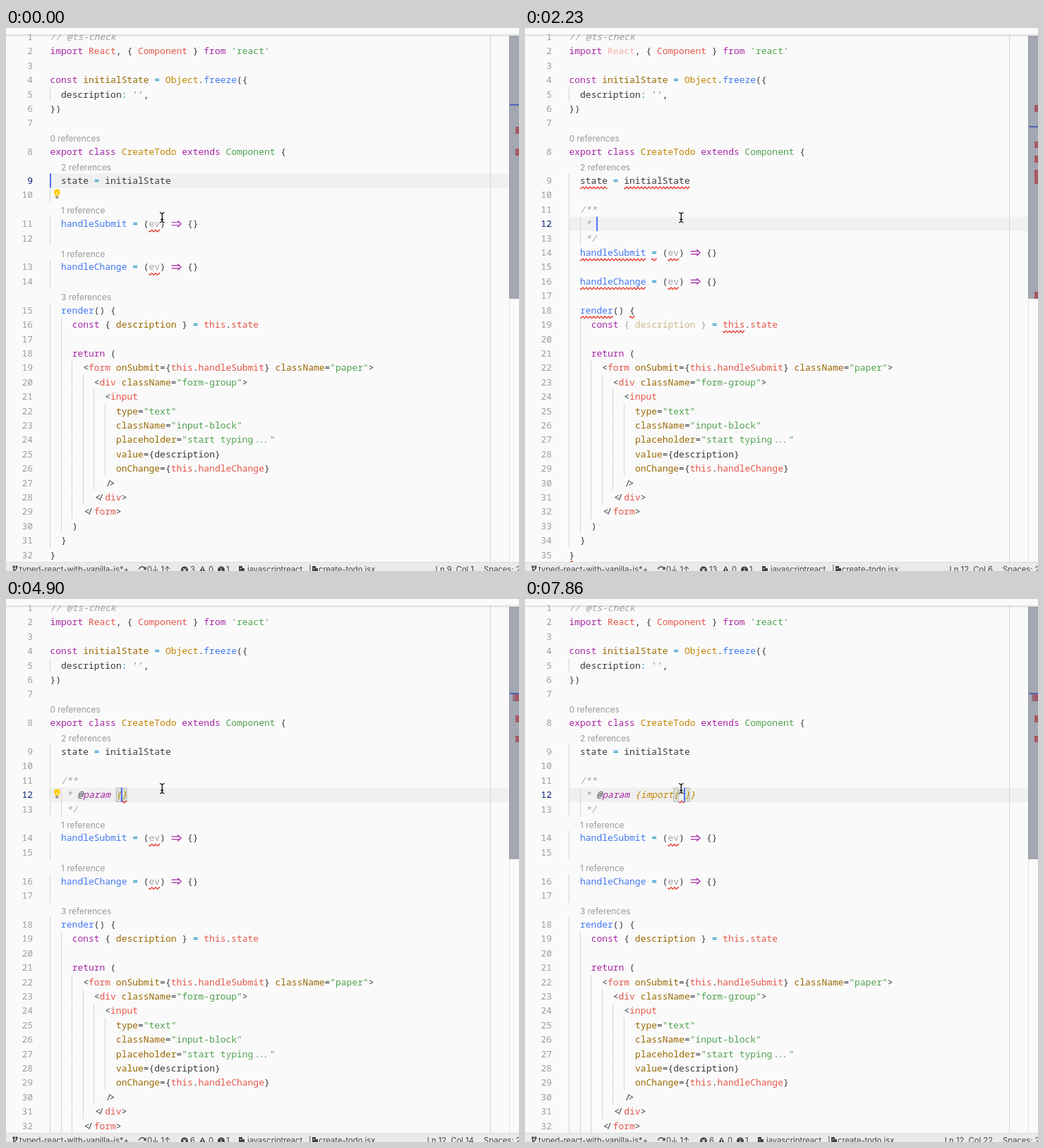
An HTML page with a canvas for the animation above (8 s loop, 727 px wide and 770 px high).

```html
<!DOCTYPE html>
<html lang="en">
<head>
<meta charset="utf-8">
<title>Editor typing</title>
<style>
html, body { margin: 0; width: 100%; height: 100%; overflow: hidden; background: #fafafa; }
canvas { display: block; }
</style>
</head>
<body>
<canvas id="stage" width="727" height="770"></canvas>
<script>
const ctx = document.getElementById('stage').getContext('2d');
const LOOP = 8000, CW = 7.78, ROW = 20.41, LEFT = 62.5;
const MONO = '12.97px "Noto Sans Mono", monospace';
const UI = 'Inter, sans-serif';

const COLORS = {
  d: '#383a42', p: '#a626a4', r: '#e45649', b: '#4078f2', k: '#0184bc', g: '#50a14f',
  o: '#c18401', w: '#986801', c: '#a0a1a7', e: '#383a42', i: '#383a42', m: '#a626a4', y: '#c18401'
};
const ITALIC = 'cimy';

// Segments split by "|": optional squiggle (~ always, ^ while broken), colour letter, text.
// An upper-case letter fades while the code is broken.
const SOURCE = [
  'c// @ts-check',
  'pimport |RReact|d, { |rComponent|d } |pfrom |g\'react\'',
  '',
  'pconst |winitialState |k= |oObject|d.|bfreeze|d({',
  'd  description|k:|g \'\'|d,',
  'd})',
  '',
  'pexport class |oCreateTodo |pextends |gComponent |d{',
  'd  |^dstate|k = |^dinitialState',
  '',
  'd  |^bhandleSubmit|d |^k=|d (|~eev|d) |p=>|d {}',
  '',
  'd  |^bhandleChange|k = |d(|~eev|d) |p=>|d {}',
  '',
  'd  |^brender|d() |^d{',
  'p    const |D{ |Wdescription|D }|k = |^rthis|d.|rstate',
  '',
  'p    return |d(',
  'd      <|rform |wonSubmit|d={|rthis|d.|rhandleSubmit|d} |wclassName|d=|g"paper"|d>',
  'd        <|rdiv |wclassName|d=|g"form-group"|d>',
  'd          <|rinput',
  'w            type|d=|g"text"',
  'w            className|d=|g"input-block"',
  'w            placeholder|d=|g"start typing..."',
  'w            value|d={description}',
  'w            onChange|d={|rthis|d.|rhandleChange|d}',
  'd          />',
  'd        </|rdiv|d>',
  'd      </|rform|d>',
  'd    )',
  'd  }',
  '^d}'
];
const LENSES = { 7: '0 references', 8: '2 references', 10: '1 reference', 12: '1 reference', 14: '3 references' };

const doc = s => ['c  /**', 'c   * ' + s, 'c   */'];
const param = s => doc('|i@|mparam|y' + s);
const ident = n => ({
  add: param(' {' + 'import'.slice(0, n) + '}'),
  cur: [12, 13 + n], match: [12, 13 + n], wave: [13, 13 + n], caret: true
});

const STEPS = [
  [0, { add: [], cur: [9, 0], lens: 1, bad: false, comment: false, caret: true, errors: 3, bulb: 11,
        marks: [[140, 10], [171, 10]], here: 109, thumb: 384, wave: null, match: [], twin: false }],
  [150, { cur: [10, 0], bulb: 0, here: 119 }],
  [450, { add: [''], cur: [11, 2], here: 128, thumb: 379 }],
  [590, { marks: [[149, 9], [179, 9]] }],
  [1040, { caret: false }],
  [1340, { add: ['k  /'], cur: [11, 3], caret: true }],
  [1790, { add: ['c  /*'], cur: [11, 4], comment: true, bad: true, errors: 13,
           marks: [[109, 9], [149, 9], [179, 9], [210, 18], [380, 8]] }],
  [1940, { add: ['c  /** */'], cur: [11, 5], comment: false }],
  [2230, { add: doc(''), cur: [12, 5], lens: null, here: 140, thumb: 384,
           marks: [[109, 10], [161, 9], [181, 10], [201, 20], [374, 10]] }],
  [2530, { add: doc('@'), cur: [12, 6], bad: false, errors: 3, marks: [[171, 10], [191, 10]] }],
  [2670, { lens: 0, here: 134, thumb: 369, marks: [[165, 10], [194, 9]] }],
  [3120, { add: doc('@pa'), cur: [12, 8], wave: [6, 8], errors: 4, marks: [[135, 10], [165, 10], [194, 9]] }],
  [3270, { add: doc('@par'), cur: [12, 9], wave: [6, 9] }],
  [3570, { add: doc('@para'), cur: [12, 10], wave: [6, 10] }],
  [3720, { add: param(''), cur: [12, 11], wave: null, errors: 3, marks: [[165, 10], [194, 9]] }],
  [3870, { lens: 0.25 }],
  [4020, { lens: 0.5 }],
  [4160, { lens: 0.75 }],
  [4310, { lens: 1, add: param(' '), cur: [12, 12] }],
  [4460, { add: param(' {}'), cur: [12, 13], match: [12, 13], twin: true,
           marks: [[135, 10], [165, 10], [194, 9]] }],
  [4900, { bulb: 13, errors: 6, wave: [13, 14] }],
  [5050, { caret: false }],
  [5490, { caret: true }],
  [5940, { caret: false }],
  [6090, ident(1)],
  [6230, ident(2)],
  [6530, ident(3)],
  [6680, ident(4)],
  [6830, ident(6)],
  [7130, { add: param(' {import()}'), cur: [12, 20], match: [19, 20], bulb: 0 }],
  [7420, { wave: null, errors: 5 }],
  [7570, { add: param(" {import(')}"), cur: [12, 21], match: [19, 21] }],
  [7860, { wave: [20, 21], errors: 6 }]
];

const colX = c => LEFT + c * CW;
const rowY = r => 12.4 + r * ROW;

function rect(color, x, y, w, h) {
  ctx.fillStyle = color;
  ctx.fillRect(x, y, w, h);
}

function stroke(color, width, ...lines) {
  ctx.strokeStyle = color;
  ctx.lineWidth = width;
  ctx.beginPath();
  for (const line of lines) line.forEach(([x, y], i) => i ? ctx.lineTo(x, y) : ctx.moveTo(x, y));
  ctx.stroke();
}

function wavy(from, to, y) {
  const pts = [];
  for (let x = colX(from); x <= colX(to); x += 0.5) pts.push([x, y + 10 + 1.3 * Math.sin(x * Math.PI * 2 / 5.2)]);
  stroke('#e51400', 1.1, pts);
}

const parse = line => line.split('|').filter(Boolean).map(s => {
  const [, mark, key, text] = s.match(/^([~^]?)(\w)(.*)$/);
  return { mark, key, text };
});
const indentOf = line => parse(line).map(s => s.text).join('').search(/\S|$/);

// Ligatures: an arrow, and pairs or dots set closer together.
function glyphs(text, col, y) {
  for (const part of text.split(/(=>|<\/|\/>|\.\.\.)/)) {
    const x = colX(col), n = part.length;
    if (part === '=>') {
      stroke(ctx.fillStyle, 1.2, [[x + 1, y - 2], [x + 12.5, y - 2]], [[x + 1, y + 2], [x + 12.5, y + 2]],
        [[x + 9.5, y - 4.5], [x + 14.5, y], [x + 9.5, y + 4.5]]);
    } else if (/^(<\/|\/>|\.\.\.)$/.test(part)) {
      [...part].forEach((ch, i) => ctx.fillText(ch, x + i * CW + ((n - 1) / 2 - i) * (n > 2 ? 2 : 3), y + 4.5));
    } else ctx.fillText(part, x, y + 4.5);
    col += n;
  }
}

function drawLine(line, y, s, commented) {
  let col = 0;
  for (const { mark, key, text } of parse(line)) {
    const low = key.toLowerCase(), color = commented ? 'c' : low;
    ctx.globalAlpha = key === 'e' || (key !== low && s.bad) ? 0.45 : 1;
    ctx.font = (ITALIC.includes(color) ? 'italic ' : '') + MONO;
    ctx.fillStyle = COLORS[color];
    glyphs(text, col, y);
    ctx.globalAlpha = 1;
    if (mark === '~' || (mark && s.bad)) wavy(col, col + text.length, y);
    col += text.length;
  }
}

function drawBulb(y) {
  ctx.fillStyle = '#fc0';
  ctx.beginPath();
  ctx.arc(72.3, y - 4, 4.4, 0, 7);
  ctx.fill();
  rect('#fc0', 70, y - 1, 4.6, 2.5);
  rect('#fff3c0', 71.6, y - 4, 1.4, 4);
  rect('#6f6f6f', 70, y + 1.8, 4.6, 1.2);
  rect('#6f6f6f', 70.6, y + 3.6, 3.4, 1.2);
}

function drawCode(s) {
  const lines = [...SOURCE.slice(0, 10), ...s.add, ...SOURCE.slice(10)];
  let row = 0;
  for (let i = 0; i < lines.length && row < 37; i++, row++) {
    const src = i < 10 ? i : i < 10 + s.add.length ? -1 : i - s.add.length;
    const indent = indentOf(lines[i] || lines.slice(i).find(Boolean));
    if (LENSES[src] && (src < 10 || s.lens !== null)) {
      ctx.globalAlpha = src < 10 ? 1 : s.lens;
      ctx.font = '11.9px ' + UI;
      ctx.fillStyle = '#999';
      ctx.fillText(LENSES[src], colX(indent), rowY(row) + 6);
      ctx.globalAlpha = 1;
      row++;
    }
    const y = rowY(row), active = i + 1 === s.cur[0];
    if (active) rect('#f0f0f0', 62, y - 10.2, 651, ROW);
    for (let c = 0; c < indent; c += 2) rect('#d4d4d6', Math.floor(colX(c)), y - ROW / 2, 1, ROW);
    if (active) {
      for (const c of s.match) {
        rect('rgba(0,100,0,.1)', colX(c), y - 9.7, CW, 19.4);
        ctx.strokeStyle = '#b9b9b9';
        ctx.lineWidth = 1;
        ctx.strokeRect(colX(c) + 0.5, y - 9.7, CW - 1, 19.4);
      }
    }
    ctx.font = MONO;
    ctx.textAlign = 'right';
    ctx.fillStyle = active ? '#0b216f' : '#9d9d9f';
    ctx.fillText(i + 1, 38, y + 4.5);
    ctx.textAlign = 'left';
    drawLine(lines[i], y, s, s.comment && i > 9);
    if (active) {
      if (s.wave) wavy(...s.wave, y);
      if (s.caret) rect('#526fff', Math.floor(colX(s.cur[1])), y - 10.2, 2, ROW);
    }
  }
  if (s.bulb) drawBulb(rowY(s.bulb));
}

function drawScroll(s) {
  rect('#d6d6d8', 686, 9, 1, 749);
  rect('#e2e2e4', 713, 9, 1, 749);
  for (const [y, h] of s.marks) rect('#ff5a5a', 722, y, 5, h);
  if (s.twin) rect('#e08a92', 718, 135, 4, 10);
  rect('#526fff', 714, s.here - 1, 13, 2);
  rect('rgba(78,86,108,.5)', 713, 11, 14, s.thumb - 11);
}

function disc(x) {
  ctx.beginPath();
  ctx.arc(x, 768.5, 5, 0, 7);
  ctx.fill();
}

function drawStatus(s) {
  const ink = '#424243', put = (text, x) => { ctx.fillStyle = ink; ctx.fillText(text, x, 772); };
  const dx = s.errors > 9 ? 6 : 0;
  rect('#eaeaeb', 0, 758, 727, 12);
  rect('#dededf', 0, 757, 727, 1);
  ctx.font = '11.2px ' + UI;
  stroke(ink, 1.4, [[11, 764], [11, 770]], [[15, 764], [15, 767], [11, 770]]);
  rect(ink, 9.5, 762.5, 3, 3);
  rect(ink, 13.5, 762.5, 3, 3);
  put('typed-react-with-vanilla-js*+', 19);
  ctx.strokeStyle = ink;
  ctx.lineWidth = 1.4;
  ctx.beginPath();
  ctx.arc(193, 768.5, 4.5, 3.3, 5.9);
  ctx.stroke();
  stroke(ink, 1.4, [[195, 767.5], [198, 767.5], [198, 764]]);
  put('0↓ 1↑', 200);
  ctx.fillStyle = ink;
  disc(253);
  stroke('#eaeaeb', 1.3, [[251, 766.5], [255, 770.5]], [[255, 766.5], [251, 770.5]]);
  put(s.errors, 261);
  ctx.beginPath();
  ctx.moveTo(278.5 + dx, 763);
  ctx.lineTo(284 + dx, 773);
  ctx.lineTo(273 + dx, 773);
  ctx.fill();
  rect('#eaeaeb', 278 + dx, 766, 1.2, 4);
  put('0', 287 + dx);
  disc(305 + dx);
  rect('#eaeaeb', 304.3 + dx, 765.5, 1.4, 1.4);
  rect('#eaeaeb', 304.3 + dx, 768, 1.4, 2);
  put('1', 312 + dx);
  for (const x of [330, 434]) {
    rect(ink, x + dx, 763, 5, 7);
    rect(ink, x + 4 + dx, 766, 4, 4);
    rect('#eaeaeb', x + 1.5 + dx, 766, 2, 1);
  }
  put('javascriptreact', 342 + dx);
  put('|', 429 + dx);
  put('create-todo.jsx', 443 + dx);
  ctx.textAlign = 'right';
  put(`Ln ${s.cur[0]}, Col ${s.cur[1] + 1}`, 663);
  ctx.textAlign = 'left';
  put('Spaces: 2', 677);
}

function drawPointer() {
  const shape = [[[218, 261.5], [221.3, 263], [224.6, 261.5]], [[221.3, 263], [221.3, 274.5]],
    [[218, 276], [221.3, 274.5], [224.6, 276]], [[219.3, 271.5], [223.3, 271.5]]];
  stroke('#fff', 3, ...shape);
  stroke('#000', 1.3, ...shape);
}

function frame(now) {
  const t = now % LOOP;
  const s = Object.assign({}, ...STEPS.filter(step => step[0] <= t).map(step => step[1]));
  rect('#fafafa', 0, 0, 727, 770);
  ctx.save();
  ctx.beginPath();
  ctx.rect(0, 9, 727, 749);
  ctx.clip();
  drawCode(s);
  drawScroll(s);
  ctx.restore();
  const shade = ctx.createLinearGradient(0, 8.5, 0, 13);
  shade.addColorStop(0, 'rgba(0,0,0,.14)');
  shade.addColorStop(1, 'rgba(0,0,0,0)');
  rect(shade, 0, 9, 727, 4);
  drawStatus(s);
  drawPointer();
}

const start = performance.now();
(function tick() {
  frame(performance.now() - start);
  requestAnimationFrame(tick);
})();
</script>
</body>
</html>
```
